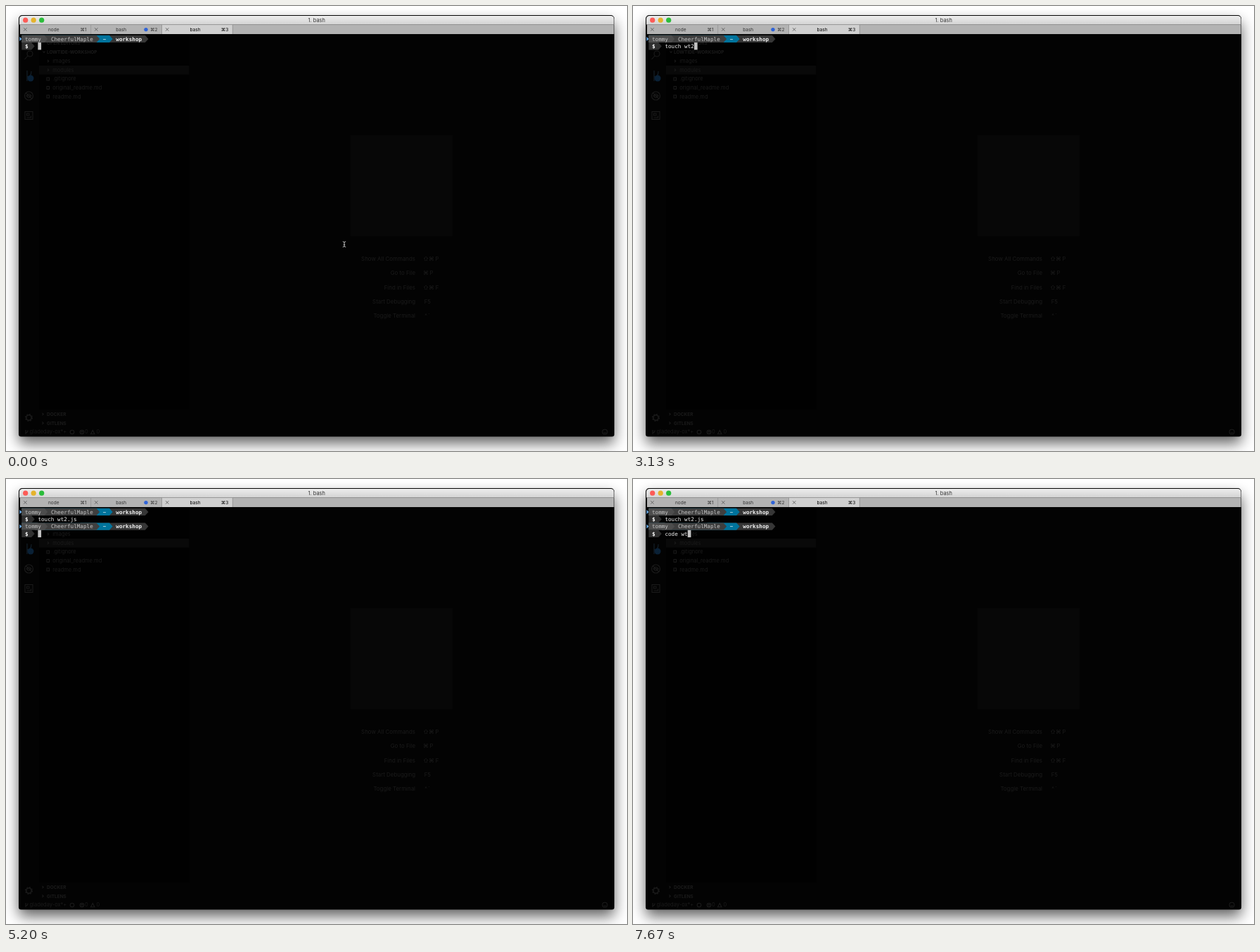
Write an HTML page that moves like this. It is 883x634 px and loops after 8000 ms.

```html
<!DOCTYPE html>
<html lang="en">
<head>
<meta charset="utf-8">
<title>Terminal</title>
<style>
  html, body { margin: 0; width: 100%; height: 100%; overflow: hidden; background: #fff; }
  svg { display: block; width: 883px; height: 634px; }
  text { font-family: Inter, "DejaVu Sans", sans-serif; white-space: pre; }
  .mono text { font: 7.67px "DejaVu Sans Mono", monospace; }
  .ghost { fill: #1b1b1b; font-size: 7.5px; }
  .ghost .head { font-size: 6.5px; font-weight: 700; }
  .ghost .hint { font-size: 7.9px; }
  .icons { fill: none; stroke: #1b1b1b; stroke-width: 1.1; }
  .tabs { font-size: 6.5px; fill: #333; }
</style>
</head>
<body>
<svg id="stage" viewBox="0 0 883 634" xmlns="http://www.w3.org/2000/svg">
  <defs>
    <linearGradient id="bar" x2="0" y2="1">
      <stop offset="0" stop-color="#ededed"/><stop offset="1" stop-color="#d3d3d3"/>
    </linearGradient>
    <filter id="blur" x="-10%" y="-10%" width="120%" height="125%"><feGaussianBlur stdDeviation="10"/></filter>
  </defs>

  <rect width="883" height="634" fill="#fff"/>
  <rect x="18" y="23" width="847" height="600" rx="5" fill="#000" opacity=".62" filter="url(#blur)"/>
  <path d="M18 613.5V18a5 5 0 0 1 5-5H860a5 5 0 0 1 5 5V610a3.5 3.5 0 0 1-3.5 3.5H21.500a3.500 3.500 0 0 1-3.500-3.500z" fill="#030303"/>

  <!-- title bar and tabs -->
  <path d="M19 26.500V18.500a4.500 4.500 0 0 1 4.500-4.500H860a4.500 4.500 0 0 1 4.500 4.500V26.500z" fill="url(#bar)"/>
  <circle cx="27.700" cy="20.200" r="3.600" fill="#fc5b57"/>
  <circle cx="39.200" cy="20.200" r="3.600" fill="#e5b32c"/>
  <circle cx="50.700" cy="20.200" r="3.600" fill="#2bbd3b"/>
  <text x="441.700" y="22.900" font-size="7.400" text-anchor="middle" fill="#333">1. bash</text>
  <rect x="20" y="26.500" width="844.500" height="13.500" fill="#b3b3b3"/>
  <rect x="222" y="26.500" width="100" height="13.500" fill="#d0d0d0"/>
  <path d="M20 26.500H864.500M120.700 26.500V40M221.500 26.500V40M322.300 26.500V40" stroke="#929292" stroke-width=".8"/>
  <g class="tabs" id="tabs"></g>
  <circle cx="199" cy="33.600" r="2.700" fill="#2e63d9"/>

  <!-- editor showing through -->
  <rect x="47" y="40" width="213.500" height="535" fill="#010101"/>
  <rect x="47" y="85" width="213.500" height="12.700" fill="#090909"/>
  <rect x="490" y="184" width="145" height="144" fill="#070707"/>
  <g class="ghost" id="ghost"></g>
  <g class="icons">
    <circle cx="34" cy="68" r="4"/><path d="M31 71L26.500 76"/>
    <path d="M30 92V107M30 101Q36 101 36 93" stroke="#15212b"/>
    <circle cx="35" cy="103" r="4.500" fill="#0a2136" stroke="none"/>
    <circle cx="32.500" cy="128" r="6"/><circle cx="32.500" cy="128" r="2.500"/><path d="M28.300 123.800L36.700 132.200M28 128H37"/>
    <path d="M27 150.500H38V161.500H27zM29.500 153H33V156H29.500zM29.500 159H35.500V156.500"/>
    <circle cx="32.500" cy="586.500" r="3.700" stroke-width="1.600"/><circle cx="32.500" cy="586.500" r="5" stroke-dasharray="2 1.930"/>
    <circle cx="94" cy="607" r="2.800"/>
    <circle cx="108" cy="607" r="2.800"/><path d="M106.500 605.500L109.500 608.500M106.500 608.500L109.500 605.500"/>
    <path d="M120.500 609.700L123.300 604.500L126 609.700z"/>
    <path d="M28 604V610M28 608Q31 608 31 604.500"/>
    <circle cx="851.500" cy="606.700" r="3.500"/><path d="M849.800 607.500Q851.500 609.500 853.200 607.500"/>
    <path d="M52.500 64.500l1.500 1.800l1.500-1.800M59 76.800l1.700 1.700l-1.700 1.700M59 89.500l1.700 1.700l-1.700 1.700M51.500 579.800l1.700 1.700l-1.700 1.700M51.500 592.500l1.700 1.700l-1.700 1.700"/>
    <path d="M58 102h3.500v4h-3.500zM58 114.500h3.500v4h-3.500zM58 127h3.500v4h-3.500z"/>
  </g>

  <g class="mono" id="term"></g>
  <path id="mouse" d="M478.800 335.700Q481 335.700 481 337V342Q481 343.300 478.800 343.300M483.200 335.700Q481 335.700 481 337M483.200 343.300Q481 343.300 481 342M479.800 340H482.200" fill="none" stroke="#d0d0d0" stroke-width=".9"/>
</svg>
<script>
const LOOP = 8000, X0 = 22.3, Y0 = 41.7, CELL = 4.62, ROW = 10.35;
const byId = id => document.getElementById(id);
const col = n => X0 + n * CELL;
const row = n => Y0 + n * ROW;

function add(parent, tag, attrs, str) {
  const el = document.createElementNS('http://www.w3.org/2000/svg', tag);
  for (const k in attrs) el.setAttribute(k, attrs[k]);
  if (str) el.textContent = str;
  parent.append(el);
  return el;
}

// tab labels
const tabs = byId('tabs');
[['node', 67.7, 110], ['bash', 163.7, 210.3], ['bash', 269, 311]].forEach(([name, x, keyX], i) => {
  const fill = i === 2 ? '#000' : '#333';
  add(tabs, 'text', { x, y: 35.8, fill, 'text-anchor': 'middle' }, name);
  add(tabs, 'text', { x: keyX, y: 35.8, fill, 'text-anchor': 'middle' }, '⌘' + (i + 1));
  const left = 25.2 + i * 100.9;
  add(tabs, 'path', { d: `M${left} 31.2l4.4 4.400m0-4.400l-4.400 4.400`, stroke: '#555', 'stroke-width': .8 });
});

// dim editor labels
const ghost = byId('ghost');
const label = (x, y, str, cls = '', anchor = 'start') =>
  add(ghost, 'text', { x, y, class: cls, 'text-anchor': anchor }, str);
label(58, 55.3, 'OPEN EDITORS', 'head');
label(58, 67.8, 'LOWTIDE-WORKSHOP', 'head');
['images', 'modules', '.gitignore', 'original_readme.md', 'readme.md']
  .forEach((name, i) => label(66.3, 81 + i * 12.65, name));
label(58, 583.8, 'DOCKER', 'head');
label(58, 596.5, 'GITLENS', 'head');
label(33.5, 609.4, 'gladeday-ox*+');
label(112, 609.4, '0');
label(128.500, 609.4, '0');
[['Show All Commands', '⇧⌘P'], ['Go to File', '⌘P'], ['Find in Files', '⇧⌘F'],
 ['Start Debugging', 'F5'], ['Toggle Terminal', '^`']].forEach(([name, keys], i) => {
  const y = 363.2 + i * 20.15;
  label(582, y, name, 'hint', 'end');
  [...keys].forEach((k, j) => label(597 + j * (i > 2 ? 4.5 : 8), y, k, 'hint', 'middle'));
});

// terminal
const term = byId('term');
const mono = (parent, c, r, str, fill, weight = 400) =>
  add(parent, 'text', { x: col(c), y: row(r) + 7.9, fill, style: `font-weight:${weight}` }, str);

// one powerline segment: a box with an arrow tip
function segment(parent, from, to, r, fill) {
  const x = col(from), y = row(r);
  add(parent, 'path', { fill, d: `M${x} ${y}H${col(to)}L${col(to + 1)} ${y + ROW / 2}L${col(to)} ${y + ROW}H${x}z` });
}

function prompt(r) {
  const g = add(term, 'g', {});
  const y = row(r);
  add(g, 'rect', { x: 19, y, width: col(39) - 19, height: ROW, fill: '#030303' });
  add(g, 'path', { d: `M19.300 ${y + 2}L22.300 ${y + ROW / 2}L19.300 ${y + ROW - 2}z`, fill: '#6cb0f0' });
  segment(g, 0, 38, r, '#363636');
  segment(g, 0, 27, r, '#00739c');
  segment(g, 0, 23, r, '#3f3f3f');
  segment(g, 0, 7, r, '#4d4d4d');
  mono(g, 1, r, 'tommy', '#c4c4c4');
  mono(g, 9, r, 'CheerfulMaple', '#c4c4c4');
  mono(g, 25, r, '~', '#fff');
  mono(g, 29, r, 'workshop', '#f2f2f2', 700);
  add(g, 'rect', { x: X0, y: y + ROW, width: 4 * CELL, height: ROW, fill: '#030303' });
  segment(g, 0, 3, r + 1, '#303030');
  mono(g, 1, r + 1, '$', '#fff', 700);
  return g;
}

const PROMPT2 = 5200, ENTER = 5000;
const lines = [
  { r: 1, str: 'touch wt2.js', keys: [530, 670, 1270, 1470, 1600, 1800, 2000, 2200, 3130, 3400, 3930, 4000] },
  { r: 3, str: 'code wt', keys: [6200, 6270, 6330, 6530, 7270, 7470, 7670] }
];
prompt(0);
const second = prompt(2);
for (const line of lines) {
  line.back = add(term, 'rect', { x: col(5), y: row(line.r), height: ROW, fill: '#030303' });
  line.text = mono(term, 5, line.r, '', '#f0f0f0');
}
const cursor = add(term, 'rect', { width: 4.7, height: ROW, fill: '#c2c2c2' });

function draw(t) {
  for (const line of lines) {
    line.n = line.keys.filter(k => k <= t).length;
    line.text.textContent = line.str.slice(0, line.n);
    line.back.setAttribute('width', line.n ? (line.n + 1) * CELL : 0);
  }
  second.style.display = t >= PROMPT2 ? '' : 'none';
  byId('mouse').style.display = t < lines[0].keys[0] ? '' : 'none';
  const [c, r] = t < ENTER ? [5 + lines[0].n, 1] : t < PROMPT2 ? [0, 2] : [5 + lines[1].n, 3];
  cursor.setAttribute('x', col(c));
  cursor.setAttribute('y', row(r));
}

function tick() {
  draw(performance.now() % LOOP);
  requestAnimationFrame(tick);
}
tick();
</script>
</body>
</html>
```
